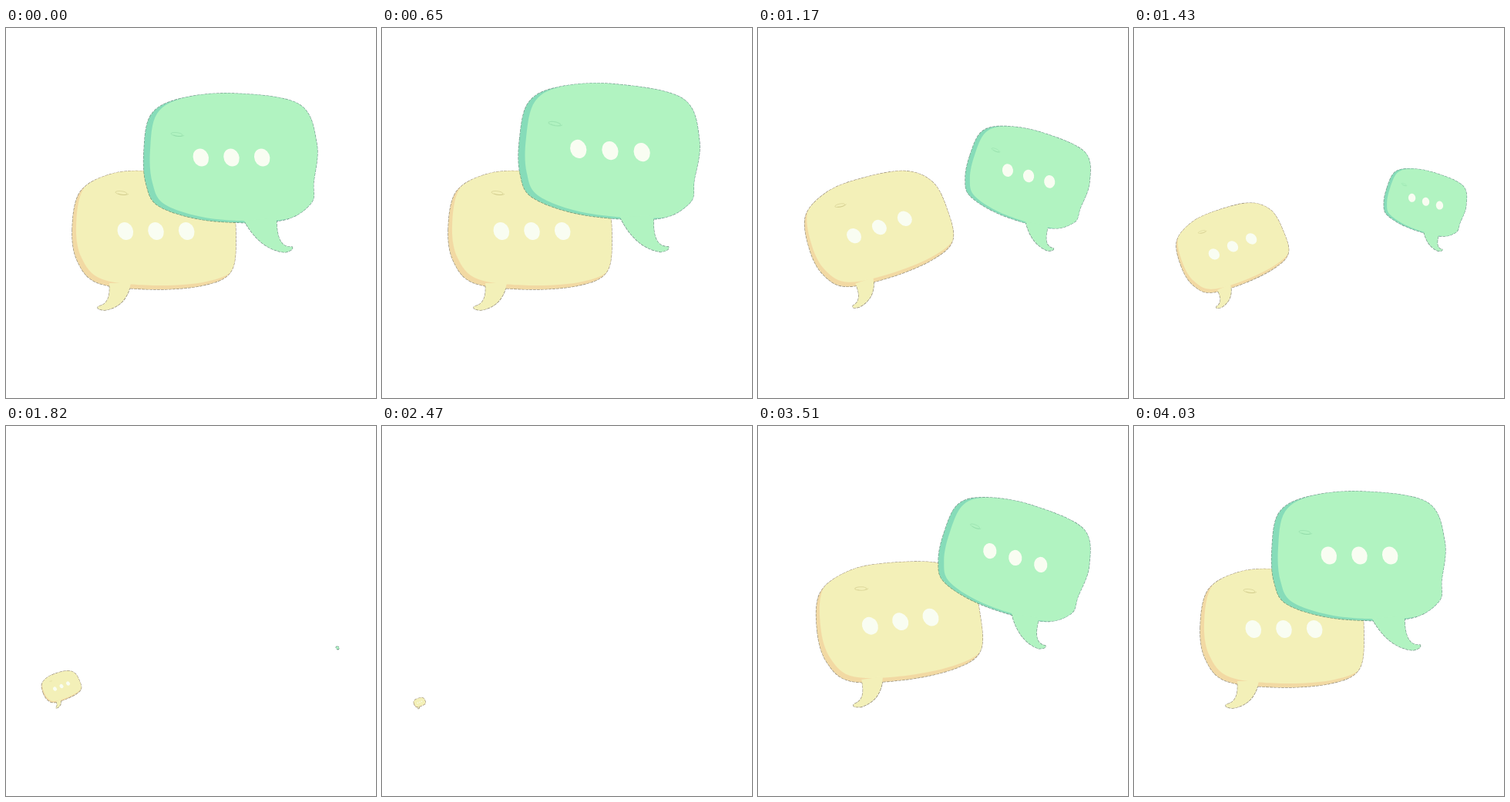
An HTML page with a canvas for the animation above (4420 ms loop, 480 px wide and 480 px high).

```html
<!DOCTYPE html>
<html lang="en">
<head>
<meta charset="utf-8">
<title>Chat bubbles</title>
<style>
  html, body { margin: 0; width: 100%; height: 100%; overflow: hidden; background: #fff; }
  canvas { display: block; width: 480px; height: 480px; }
</style>
</head>
<body>
<canvas id="stage" width="480" height="480"></canvas>
<script>
const ctx = document.getElementById('stage').getContext('2d');
const STEP = 130, STEPS = 34, REST = 4, SHRINK = 7;

const clamp = v => Math.max(0, Math.min(1, v));
const mix = (a, b, k) => a + (b - a) * k;
const easeOut = k => 1 - (1 - k) ** 2;

// Smooth closed curve through key points, given as "x,y x,y ...".
function blob(text) {
  const pts = text.split(' ').map(pair => pair.split(',').map(Number));
  const at = i => pts[(i + pts.length) % pts.length];
  const path = new Path2D();
  path.moveTo(...pts[0]);
  pts.forEach((b, i) => {
    const a = at(i - 1), c = at(i + 1), d = at(i + 2);
    path.bezierCurveTo(
      b[0] + (c[0] - a[0]) / 6, b[1] + (c[1] - a[1]) / 6,
      c[0] - (d[0] - b[0]) / 6, c[1] - (d[1] - b[1]) / 6, ...c);
  });
  return path;
}

// A bubble turns and shrinks about its pivot while the pivot drifts to its vanishing point.
const yellow = {
  rim: '#f2d9a3', face: '#f3f0b8', edge: 'rgba(100,88,55,.65)', mark: 'rgba(190,182,115,.4)',
  body: blob('86,262 96,213 135,190 185,186 255,196 291,226 298,275 291,317 255,334 190,339 120,331 93,303'),
  tail: new Path2D('M162,331 Q156,362 128,366 Q116,365 120,361 Q137,358 134,331'),
  depth: [5, -5],
  dot: [194.5, 263.5],
  scribble: [150, 214],
  pivot: [120, 328], vanish: [39, 367], bend: 1.25,
  shrink: p => clamp((p - SHRINK) / 8.4) ** 1.447,
  size: () => 1,
  turn: p => -22.4 * easeOut(clamp((p - 6) / 5))
};

const green = {
  rim: '#86dcb9', face: '#b1f3c1', edge: 'rgba(50,105,80,.65)', mark: 'rgba(130,208,157,.4)',
  body: blob('179,160 188,113 225,92 295,85 380,99 403,150 399,200 395,228 355,250 265,250 200,232 182,203'),
  tail: new Path2D('M309,250 Q330,288 362,291 Q374,288 371,284 Q350,286 351,246'),
  depth: [8, -2],
  dot: [292.5, 168],
  scribble: [222, 138],
  pivot: [372, 291], vanish: [432, 290], bend: 1,
  shrink: p => clamp((p - SHRINK) / 7.1) ** 1.37,
  size: p => p < SHRINK ? 1 + .04 * (p - REST) ** 1.5 : .86,
  turn: p => 15.2 * clamp((p - REST) / 3) ** 1.5
};

function drawScribble([x, y]) {
  ctx.beginPath();
  for (let a = 0; a < 9; a += .3) {
    ctx.lineTo(x + (9 - a / 3) * Math.cos(a), y + 2.5 * Math.sin(a + .4));
  }
  ctx.stroke();
}

function drawDots([x, y]) {
  for (const side of [-1, 0, 1]) {
    ctx.beginPath();
    ctx.ellipse(x + side * 39.7, y, 10, 11.8, -.4, 0, Math.PI * 2);
    ctx.fill();
  }
}

function drawBubble(bubble, p) {
  const shrink = bubble.shrink(p);
  const scale = bubble.size(p) * (1 - shrink);
  if (scale <= 0) return;
  const { pivot, vanish, body, tail } = bubble;

  ctx.save();
  ctx.translate(
    mix(pivot[0], vanish[0], shrink ** bubble.bend),
    mix(pivot[1], vanish[1], shrink));
  ctx.rotate(bubble.turn(p) * Math.PI / 180);
  ctx.scale(scale, scale);
  ctx.translate(-pivot[0], -pivot[1]);

  ctx.strokeStyle = bubble.edge;
  ctx.lineWidth = 1.4 / scale;
  ctx.setLineDash([4 / scale, 1 / scale]);
  ctx.stroke(body);
  ctx.stroke(tail);
  ctx.setLineDash([]);

  ctx.fillStyle = bubble.rim;
  ctx.fill(body);

  // The face is the body shifted inside itself, which leaves the rim showing.
  ctx.fillStyle = bubble.face;
  ctx.save();
  ctx.clip(body);
  ctx.translate(...bubble.depth);
  ctx.fill(body);
  ctx.restore();
  ctx.fill(tail);

  ctx.strokeStyle = bubble.mark;
  ctx.lineWidth = 1;
  drawScribble(bubble.scribble);

  ctx.fillStyle = '#f9fdf2';
  drawDots(bubble.dot);
  ctx.restore();
}

let start;
function tick(now) {
  start ??= now;
  const i = Math.floor((now - start) / STEP) % STEPS;
  const p = Math.max(REST, Math.min(i, STEPS - i)); // out, then back the same way
  ctx.fillStyle = '#fff';
  ctx.fillRect(0, 0, 480, 480);
  drawBubble(yellow, p);
  drawBubble(green, p);
  requestAnimationFrame(tick);
}
requestAnimationFrame(tick);
</script>
</body>
</html>
```
